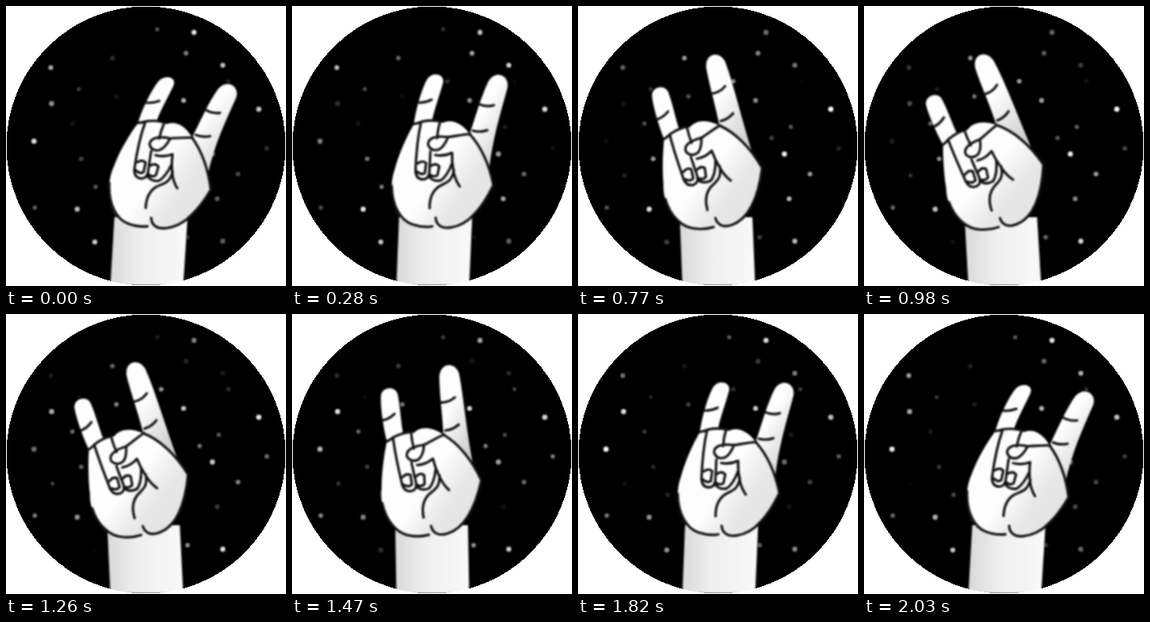
These frames come from a looping animation (350x350 px, 2.1 s). An HTML page:

```html
<!DOCTYPE html>
<html lang="en">
<head>
<meta charset="utf-8">
<title>Rock on</title>
<style>
html, body { margin: 0; width: 100%; height: 100%; overflow: hidden; background: #fff; }
svg { display: block; width: 100vw; height: 100vh; }
.soft { filter: blur(1px); }
#lines { fill: none; stroke: #111; stroke-width: 3.1; stroke-linecap: round; stroke-linejoin: round; }
</style>
</head>
<body>
<svg viewBox="0 0 350 350">
  <defs>
    <linearGradient id="armFill">
      <stop offset="0" stop-color="#d9d9d9"/>
      <stop offset=".4" stop-color="#efefef"/>
      <stop offset="1" stop-color="#f9f9f9"/>
    </linearGradient>
    <linearGradient id="palmFill" x1=".52" y1=".58" x2=".85" y2=".9">
      <stop offset="0" stop-color="#fdfdfd"/>
      <stop offset=".55" stop-color="#e8e8e8"/>
      <stop offset="1" stop-color="#e4e4e4"/>
    </linearGradient>
    <linearGradient id="indexFill" x1=".35" y1=".4" x2=".75" y2=".95">
      <stop offset="0" stop-color="#fdfdfd"/>
      <stop offset="1" stop-color="#cfcfcf"/>
    </linearGradient>
  </defs>
  <rect width="350" height="350"/>
  <g id="stars" class="soft" fill="#fff"></g>
  <g class="soft">
    <path id="arm" fill="url(#armFill)"/>
    <path id="index" fill="url(#indexFill)"/>
    <path id="palm" fill="url(#palmFill)"/>
    <path id="lines"/>
  </g>
  <path d="M0,0H350V350H0ZM175,.5A174.5,174.5 0 0 0 175,349.5A174.5,174.5 0 0 0 175,.5Z" fill="#fff" fill-rule="evenodd" shape-rendering="crispEdges"/>
</svg>
<script>
const LOOP = 2100, STEP = 70, TAU = Math.PI * 2;
const byId = id => document.getElementById(id);

// x, y, brightest, dimmest (percent), loop position of the peak (percent)
const stars = [
  '235,33,90,40,95', '225,59,70,10,20', '271,74,85,10,11', '316,129,100,75,40',
  '222,118,85,50,75', '56,77,75,10,10', '57,122,95,0,78', '35,169,100,5,88',
  '94,191,65,15,34', '89,254,95,50,24', '111,295,85,0,5', '36,252,55,28,72',
  '133,65,65,10,37', '91,104,33,5,16', '83,147,45,8,58', '326,178,50,5,70',
  '290,210,65,28,42', '258,185,95,40,42', '264,241,80,3,27', '271,294,90,35,56',
  '266,151,42,8,50', '242,165,50,20,70', '227,289,60,5,66', '194,94,65,10,50',
  '138,113,55,5,60', '189,29,38,0,90', '112,226,50,5,20', '278,94,30,0,77',
  '58,212,28,0,57', '328,262,28,0,13'
].map(row => row.split(',').map(Number));

const shapes = {
  index: `M196,156 C197,132 195,100 197,80 C200,62 219,63 222,79
    C225,110 225,150 231,194 L205,190 Z`,
  palm: `M125,156 C122,140 120,112 122,98 C124,87 140,86 143,97 C145,112 144,132 146,148
    L160,147 C168,140 182,141 196,152 C214,164 230,186 240,210 C234,231 225,250 214,262
    C201,274 187,279 177,273 C164,281 142,279 130,268 C117,255 112,231 115,215
    C116,196 120,174 125,156 Z`,
  lines: [
    // finger creases
    'M122,129 Q130,128 137,122', 'M196,112 Q206,113 214,107', 'M199,147 Q208,147 216,141',
    // folded fingers and nails
    'M125,156 Q130,154 134,151 Q145,146 156,146 Q156,157 158,167',
    'M133,152 C134,170 137,190 141,212 Q144,222 153,220 Q160,218 158,208 L154,185',
    'M142,202 Q147,197 152,200 L153,212 Q149,216 143,212',
    'M159,202 Q164,197 169,201 L169,212 Q165,216 160,213',
    'M159,215 Q164,221 174,218 Q181,212 184,193',
    // thumb
    'M197,152 C188,155 179,160 171,163 C158,164 147,168 149,177 Q154,185 163,181 Q169,177 171,164',
    'M161,188 Q172,188 181,181 Q183,192 188,204 Q192,214 199,221',
    'M188,202 C188,218 181,219 173,226 Q163,236 166,254',
    // palm outline
    'M115,234 C119,257 132,273 147,276 Q160,279 172,276',
    'M175,265 C177,274 184,278 195,275 C218,269 231,244 240,211 C230,186 214,164 196,152'
  ].join('')
};

const starEls = stars.map(([cx, cy, bright]) => {
  const dot = document.createElementNS('http://www.w3.org/2000/svg', 'circle');
  const attrs = { cx, cy, r: 2.1 + bright / 85 };
  for (const key in attrs) dot.setAttribute(key, attrs[key]);
  return byId('stars').appendChild(dot);
});

// Bend the hand along a curved spine rising from the wrist;
// the little-finger side is squeezed a bit as the hand leans right.
function bend(x, y, sway) {
  const h = 268 - y, base = .16, curl = .002;
  const angle = sway * (base + curl * h);
  const drop = sway * sway * (base * base * h + base * curl * h * h + curl * curl * h ** 3 / 3) / 2;
  const side = x - 176;
  const squeeze = 3.8e-6 * sway * (1 + sway) * Math.max(0, -side) * h * h;
  return [
    176 + sway * (6 + base * h + curl * h * h / 2) + side * Math.cos(angle),
    y + drop + squeeze + side * Math.sin(angle)
  ];
}
const bendPath = (d, sway) => d.replace(/([\d.]+),([\d.]+)/g,
  (_, x, y) => bend(+x, +y, sway).map(v => v.toFixed(2)).join());

function render(ms) {
  const p = Math.floor(ms % LOOP / STEP) * STEP / LOOP;
  const sway = .1 + .9 * Math.cos(TAU * p);
  for (const id in shapes) byId(id).setAttribute('d', bendPath(shapes[id], sway));
  byId('arm').setAttribute('d',
    `M${130 + 5.5 * sway},264 L130.5,349 H221.5 L${221 + 6 * sway},264 Z`);
  stars.forEach(([, , bright, dim, peak], i) => {
    const glow = (1 + Math.cos(TAU * (p - peak / 100))) / 2;
    starEls[i].setAttribute('opacity', (dim + (bright - dim) * glow) / 100);
  });
}

const start = performance.now();
function tick() {
  render(performance.now() - start);
  requestAnimationFrame(tick);
}
tick();
</script>
</body>
</html>
```
